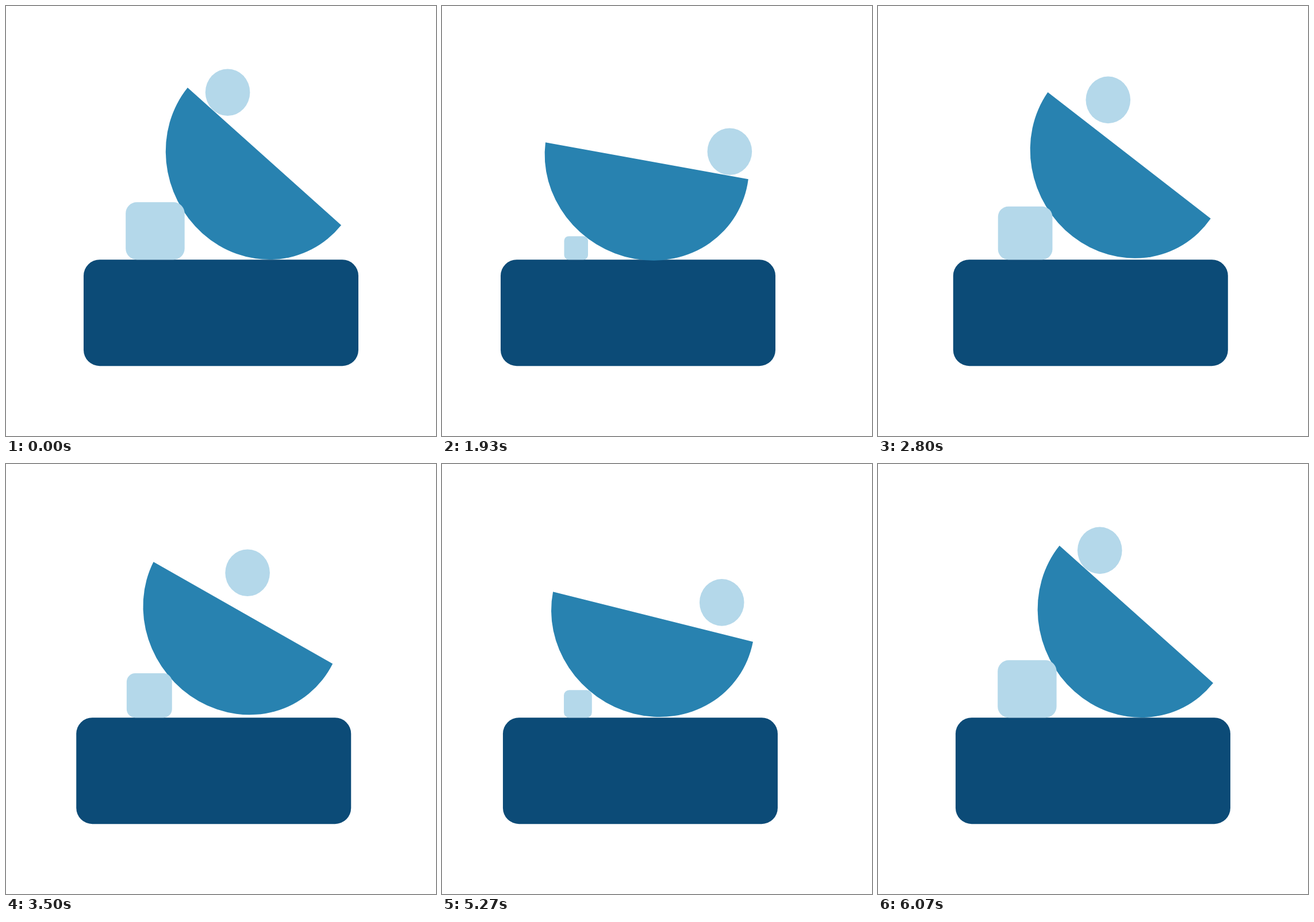
Recreate the animation shown at these times as an HTML page with a canvas. Size 748x748 px, loop 6.11 s.

```html
<!DOCTYPE html>
<html lang="en">
<head>
<meta charset="utf-8">
<title>Balancing shapes</title>
<style>
  html, body { margin: 0; width: 100%; height: 100%; overflow: hidden; background: #fff; }
  canvas { display: block; width: 748px; height: 748px; }
</style>
</head>
<body>
<canvas id="stage" width="748" height="748"></canvas>
<script>
const ctx = document.getElementById('stage').getContext('2d');

const LOOP = 6110, CYCLE = LOOP / 2;
const TILT_END = 1050, ROLL_END = 1985, BACK_END = 3035;
const FLOOR = 441.2;
const NAVY = '#0c4b77', BLUE = '#2882b0', PALE = '#b4d8ea';

// Bowl: half ellipse, slightly skewed along its rim
const RIM = 179.3, SKEW = 8.9, DEPTH = 171.7;

const lerp = (a, b, k) => a + (b - a) * k;
const ease = p => {
  p = Math.min(1, Math.max(0, p));
  return p * p * (3 - 2 * p);
};
const phase = (t, from, to) => ease((t - from) / (to - from));

// The first half steps at 20 pictures a second, the second half at 30
function snap(t) {
  const r = t % 100, base = t - r;
  if (t < 3100) return base + (r < 30 ? 0 : 50);
  return base + (r < 30 ? 0 : r < 70 ? 100 / 3 : 200 / 3);
}

const HIGH = { x: 385.6, y: 150.2, h: 81.6 };
const LOW = { x: 475, y: 251.3, h: 77.6 };
const EDGE = { x: 500.5, y: 253.2, h: 81.6 };

function mixBall(a, b, k, kh = k) {
  return { x: lerp(a.x, b.x, k), y: lerp(a.y, b.y, k), h: lerp(a.h, b.h, kh) };
}

function ballAt(t, k) {
  if (t < TILT_END) return mixBall(HIGH, LOW, k, k ** 5);
  if (t < ROLL_END) return mixBall(LOW, EDGE, phase(t, TILT_END, ROLL_END));
  return mixBall(HIGH, EDGE, k);
}

function box(x, y, w, h, r, color) {
  ctx.fillStyle = color;
  ctx.beginPath();
  ctx.roundRect(x, y, w, h, r);
  ctx.fill();
}

function bowl(k) {
  const bow = 4 * k * (1 - k);
  ctx.save();
  ctx.translate(lerp(449.5, 356.4, k) - 1.2 * bow, lerp(261.6, 269.2, k) - 6 * bow);
  ctx.rotate(lerp(41.83, 10.28, k) * Math.PI / 180);
  ctx.transform(RIM, 0, SKEW, DEPTH, 0, 0);
  ctx.fillStyle = BLUE;
  ctx.beginPath();
  ctx.arc(0, 0, 1, 0, Math.PI);
  ctx.closePath();
  ctx.fill();
  ctx.restore();
}

function ball({ x, y, h }) {
  ctx.fillStyle = PALE;
  ctx.beginPath();
  ctx.ellipse(x, y, 38.8, h / 2, 0, 0, Math.PI * 2);
  ctx.fill();
}

function draw(t) {
  // k: 0 = steep pose, 1 = flat pose
  const k = t < ROLL_END ? phase(t, 0, TILT_END) : 1 - phase(t, ROLL_END, BACK_END);
  ctx.fillStyle = '#fff';
  ctx.fillRect(0, 0, 748, 748);

  box(lerp(135, 102, k), FLOOR, 478, 185, 28, NAVY);
  bowl(k);
  const w = lerp(102.5, 41.5, k), h = lerp(100, 40.8, k);
  box(lerp(208.2, 212.5, k), FLOOR - h, w, h, w * 0.19, PALE);
  ball(ballAt(t, k));
}

const start = performance.now();
function tick() {
  const t = (performance.now() - start) % LOOP;
  draw(snap(t) % CYCLE);
  requestAnimationFrame(tick);
}
tick();
</script>
</body>
</html>
```
